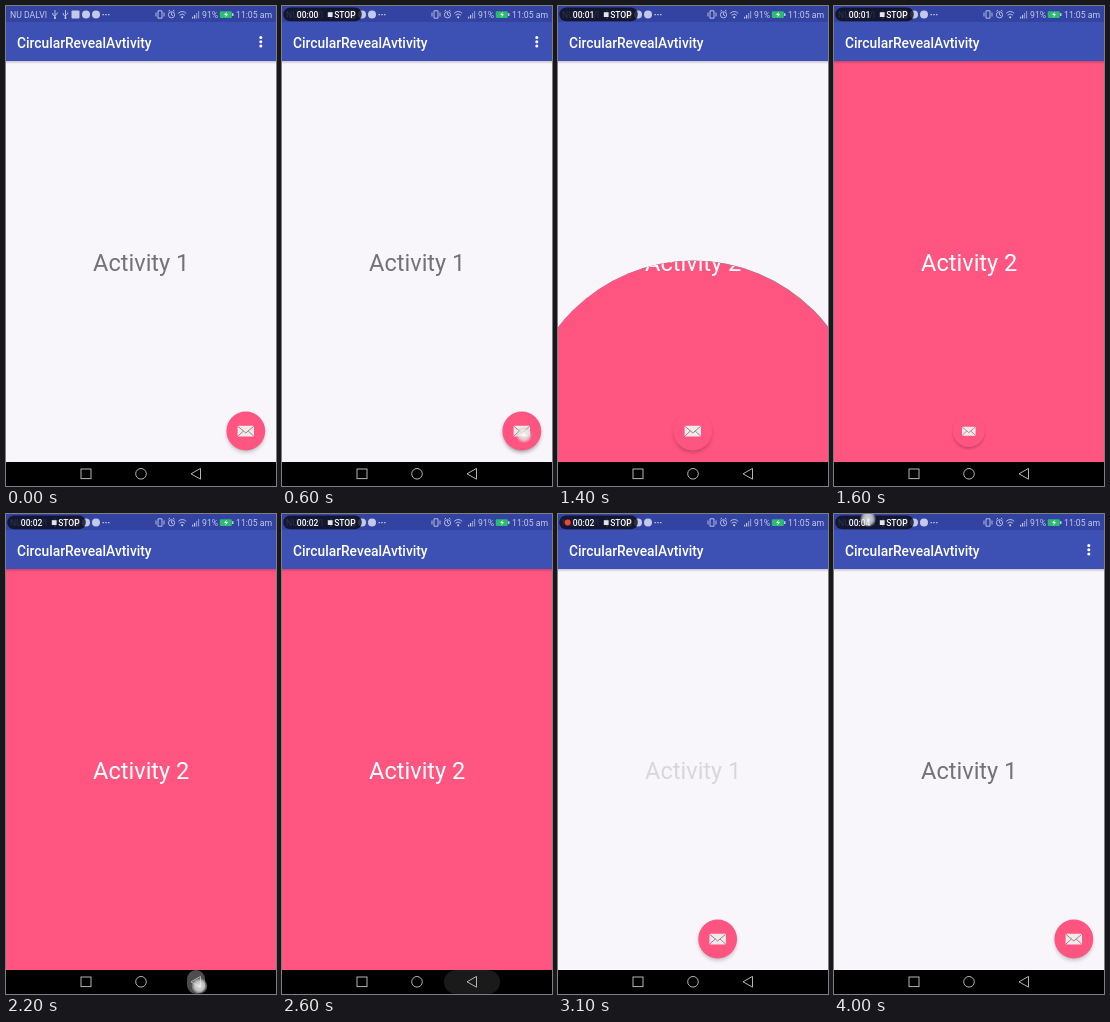
These frames come from a looping animation (270x480 px, 4.1 s). An HTML page:

```html
<!DOCTYPE html>
<html lang="en">
<head>
<meta charset="utf-8">
<title>Circular reveal</title>
<style>
  html, body { margin: 0; width: 100%; height: 100%; overflow: hidden; background: #000; }
  svg { display: block; width: 100vw; height: 100vh; font-family: Roboto, sans-serif; }
  .status { font-size: 8.7px; fill: #c3c9e8; }
  .big { font-size: 23.55px; text-anchor: middle; }
  .line { fill: none; stroke: #c3c9e8; stroke-width: .9; }
  .nav { fill: none; stroke: #b4b4b4; stroke-width: 1; }
</style>
</head>
<body>
<svg viewBox="0 0 270 480">
  <defs>
    <linearGradient id="drop" x2="0" y2="1">
      <stop offset="0" stop-color="#000" stop-opacity=".2"/>
      <stop offset="1" stop-color="#000" stop-opacity="0"/>
    </linearGradient>
    <radialGradient id="spot">
      <stop offset="0" stop-color="#fff" stop-opacity=".85"/>
      <stop offset=".65" stop-color="#e4e4e4" stop-opacity=".75"/>
      <stop offset="1" stop-color="#bbb" stop-opacity=".3"/>
    </radialGradient>
    <filter id="blur" x="-50%" y="-50%" width="200%" height="200%"><feGaussianBlur stdDeviation="2.2"/></filter>
    <clipPath id="hole"><circle id="holeShape" cx="135" cy="425" r="0"/></clipPath>
    <g id="usb">
      <path class="line" d="M0-4.5V4M-2.2-1.5V.3L0 2M2.2-2V-.7L0 1"/>
      <circle cy="3.5" r="1.1" fill="#c3c9e8"/>
    </g>
  </defs>

  <!-- first screen -->
  <rect width="270" height="480" fill="#f8f6fa"/>
  <text id="first" class="big" x="135.2" y="265" fill="#747275">Activity 1</text>

  <!-- second screen -->
  <circle id="rim" cx="135.4" cy="424.7" r="0" fill="#7d8986"/>
  <g clip-path="url(#hole)">
    <rect y="55" width="270" height="401" fill="#ff5580"/>
    <text class="big" x="135.2" y="265" fill="#fff">Activity 2</text>
  </g>

  <g id="fab">
    <circle id="shade" cy="2.6" r="18.5" opacity=".25" filter="url(#blur)"/>
    <circle r="19.4" fill="#ff5580"/>
    <rect x="-8.2" y="-5.2" width="16.4" height="10.8" rx="1" fill="#f1e9ea"/>
    <path d="M-7.8-4.6L0 2L7.8-4.6M-7.8 5L-2.4 0M7.8 5L2.4 0" fill="none" stroke="#94777e" stroke-width=".9"/>
  </g>

  <!-- bars -->
  <rect y="55" width="270" height="3" fill="url(#drop)"/>
  <rect width="270" height="55" fill="#3d51b5"/>
  <rect width="270" height="16" fill="#3343a1"/>
  <text x="11" y="41.8" font-size="13.8" font-weight="500" fill="#fff">CircularRevealAvtivity</text>
  <g id="menu" fill="#fff">
    <circle cx="254.8" cy="31.5" r="1.5"/><circle cx="254.8" cy="35.8" r="1.5"/><circle cx="254.8" cy="40.1" r="1.5"/>
  </g>

  <g class="status">
    <text x="4" y="11.8">NU DALVI</text>
    <use href="#usb" x="49" y="8.5"/>
    <use href="#usb" x="59.5" y="8.5"/>
    <rect x="65.5" y="4.5" width="8" height="8" rx="1"/>
    <circle cx="80" cy="8.5" r="4"/>
    <circle cx="90" cy="8.5" r="4"/>
    <path d="M96.5 8h1.4v1.3h-1.4zM99.3 8h1.4v1.3h-1.4zM102.1 8h1.4v1.3h-1.4z"/>
    <path class="line" d="M152 4.8h4v7.4h-4zM150 6.5v4M158 6.5v4"/>
    <path class="line" d="M162.5 5.2l1.5-1.2M168.5 5.2L167 4M165.5 6.5v2.4l1.5.8"/>
    <circle class="line" cx="165.5" cy="8.8" r="3.1"/>
    <path class="line" d="M172.2 7.3q4-3.6 8 0M173.6 9.2q2.6-2.4 5.2 0"/>
    <circle cx="176.2" cy="11.3" r="1.1"/>
    <path d="M186 10.8h1.2v1.7h-1.2zM188 9h1.2v3.5h-1.2z"/>
    <path d="M190 7h1.2v5.5h-1.2zM192 5h1.2v7.5h-1.2z" opacity=".6"/>
    <text x="196" y="11.8">91%</text>
    <rect x="213.8" y="5.2" width="12" height="6.8" rx="1" fill="#2cbb70"/>
    <rect x="226" y="7.2" width="1.5" height="2.8"/>
    <path d="M220.8 5.8l-2.7 3.2h1.8l-.7 2.5 2.8-3.4h-1.8z" fill="#fff"/>
    <text x="230" y="11.8">11:05 am</text>
  </g>

  <rect y="456" width="270" height="24"/>
  <rect id="ripple" y="456" height="24" fill="#fff" opacity="0"/>
  <rect class="nav" x="75" y="463" width="10" height="9.6"/>
  <circle class="nav" cx="135" cy="467.8" r="5.3"/>
  <path class="nav" d="M185 467.8l9.5-5.4v10.8z"/>

  <!-- recorder pill -->
  <g id="pill" font-size="8.5" font-weight="500" fill="#fff">
    <rect x="1.3" y="1.6" width="78.5" height="13.6" rx="6.8" fill="#0b0c14" opacity=".8"/>
    <circle id="dot" cx="9.7" cy="8.5" r="3" fill="#f4432e"/>
    <text id="clock" x="14.8" y="11.6">00:00</text>
    <rect x="45.8" y="6.2" width="4.8" height="4.8" fill="#e4e4e8"/>
    <text x="52.2" y="11.6">STOP</text>
  </g>
  <circle id="touch" r="7.8" fill="url(#spot)"/>
</svg>
<script>
const LOOP = 4100, STEP = 100;
const $ = id => document.getElementById(id);
const clamp = v => Math.min(1, Math.max(0, v));
const part = (t, start, len) => clamp((t - start) / len);
const within = (t, spans) => spans.some(([a, b]) => t >= a && t < b);
const set = (id, name, value) => $(id).setAttribute(name, value);
const show = (id, on) => set(id, 'visibility', on ? 'visible' : 'hidden');

// Material standard curve: cubic-bezier(.4, 0, .2, 1)
function standard(x) {
  let lo = 0, hi = 1;
  for (let i = 0; i < 24; i++) {
    const s = (lo + hi) / 2, q = 1 - s;
    if (1.2 * s * q * q + .6 * s * s * q + s * s * s < x) lo = s; else hi = s;
  }
  return lo * lo * (3 - 2 * lo);
}
const easeBoth = x => .5 - Math.cos(x * Math.PI) / 2;

const SMALL = 19, FULL = 396;
const OPEN = 1269, CLOSE = 2614, REVEAL = 300;
const ticks = [1200, 2200, 3200, 4000];
const dotOn = [[700, 1200], [1800, 2200], [2700, 3200], [3800, 4000]];
const touches = [
  { from: 500, to: 800, x: 242, y: 429 },
  { from: 2200, to: 2400, x: 193.5, y: 472 },
  { from: 3900, to: 4100, x: 34, y: 5 }
];

function draw(t) {
  // shared button slides to the middle and back while the label fades
  const away = standard(part(t, 997, 300)) - standard(part(t, 3025, 300));
  const closed = CLOSE + REVEAL;
  const size = t < closed ? 1 - part(t, OPEN + REVEAL, 180) : 1;
  set('fab', 'transform', `translate(${239.8 - 105 * away} 425) scale(${size})`);
  show('fab', size > 0);
  set('shade', 'opacity', within(t, [[500, 900]]) ? .38 : .25);
  set('first', 'opacity', 1 - away);
  show('menu', t < 1000 || t >= 3400);

  const open = easeBoth(part(t, OPEN, REVEAL)) - easeBoth(part(t, CLOSE, REVEAL));
  const r = t > OPEN && t < closed ? SMALL + (FULL - SMALL) * open : 0;
  set('holeShape', 'r', r);
  set('rim', 'r', r);

  // back button ripple widens, thins out, then fades
  const grow = part(t, 2200, 300), width = 18 + 38 * grow;
  set('ripple', 'x', 190 - width / 2);
  set('ripple', 'width', width);
  set('ripple', 'rx', Math.min(12, width / 2));
  set('ripple', 'opacity', t < 2200 ? 0 : (.3 - .2 * grow) * (1 - part(t, 2700, 300)));

  show('pill', t >= 100);
  show('dot', within(t, dotOn));
  $('clock').textContent = '00:0' + ticks.filter(k => t >= k).length;

  const hit = touches.find(h => t >= h.from && t < h.to);
  show('touch', hit);
  if (hit) set('touch', 'transform', `translate(${hit.x} ${hit.y})`);
}

const begin = performance.now();
function frame() {
  const t = (performance.now() - begin) % LOOP;
  draw(Math.floor(t / STEP) * STEP);
  requestAnimationFrame(frame);
}
draw(0);
requestAnimationFrame(frame);
</script>
</body>
</html>
```
